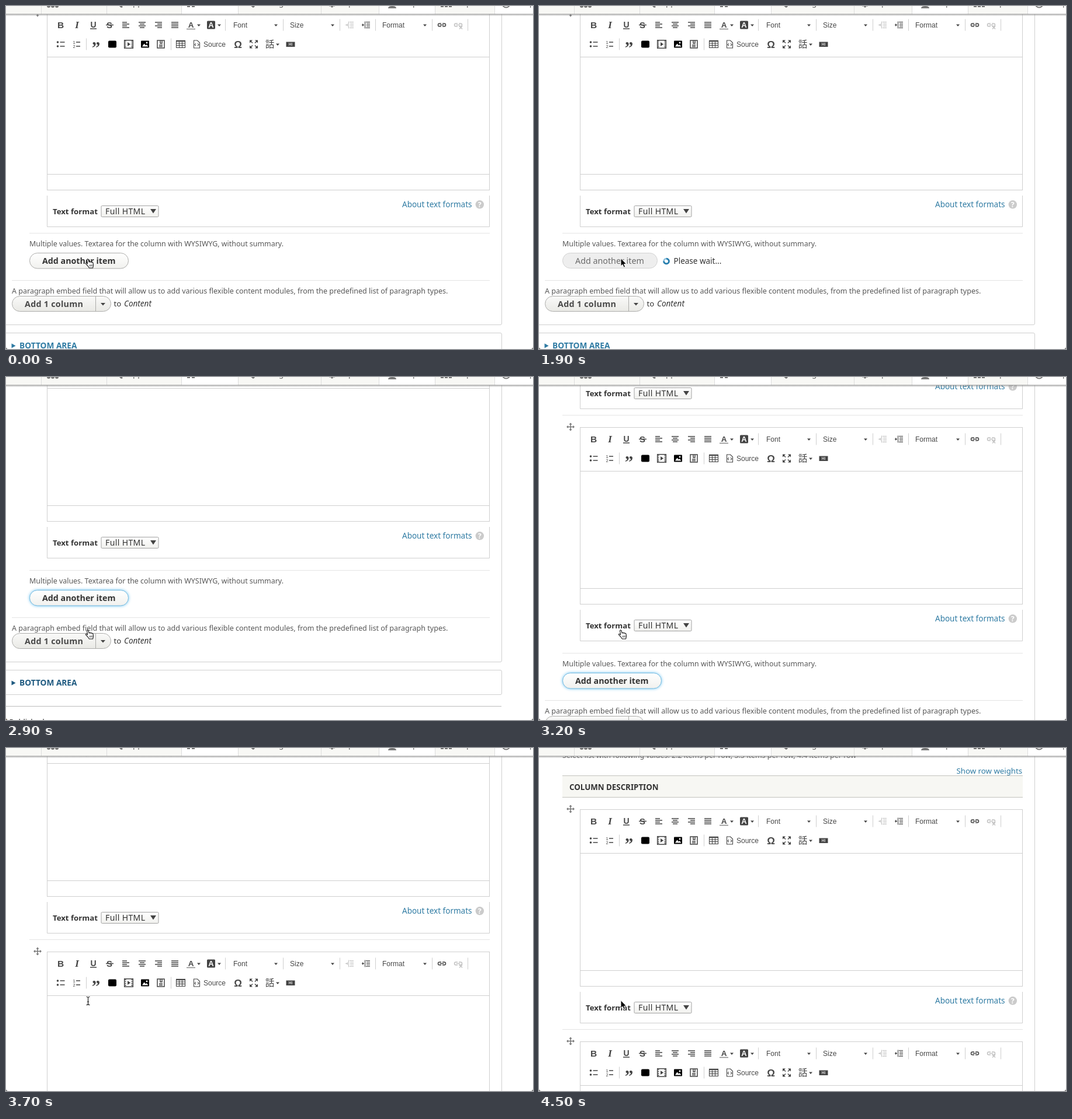
An HTML page that plays this animation: 902x588 px, repeating every 4.6 s.

```html
<!DOCTYPE html>
<html lang="en">
<head>
<meta charset="utf-8">
<title>Add another item</title>
<style>
html, body { margin: 0; width: 100%; height: 100%; overflow: hidden; background: #fff; }
svg { display: block; width: 902px; height: 588px; font-family: "Noto Sans", "Open Sans", sans-serif; }
text { fill: #333; white-space: pre; }
.b { font-weight: 700; }
.ui { font-family: "Liberation Sans", Arial, sans-serif; fill: #484848; }
.serif { font-family: "Liberation Serif", serif; fill: #444; }
.cjk { font-family: "Noto Sans CJK JP", "Noto Sans CJK", sans-serif; fill: #444; }
.note { fill: #585858; }
.link { fill: #2f7ba3; }
.off { opacity: .32; }
.ico { fill: none; stroke: #444; stroke-width: 1.5; }
.thin { stroke-width: 1.1; }
.solid { fill: #444; }
.line { fill: none; stroke: #cfcfcf; }
.soft { stroke: #e4e4e4; }
.btn { fill: url(#btn); stroke: #acacaa; }
.lit { fill: url(#lit); }
.glow { stroke: #74b9de; filter: drop-shadow(0 0 2.5px #6cc3f2); }
</style>
</head>
<body>
<svg viewBox="0 0 902 588">
  <defs>
    <linearGradient id="btn" x2="0" y2="1"><stop stop-color="#fafaf9"/><stop offset="1" stop-color="#e9e9e5"/></linearGradient>
    <linearGradient id="lit" x2="0" y2="1"><stop stop-color="#fff"/><stop offset="1" stop-color="#f1f1ee"/></linearGradient>
    <linearGradient id="blue" x2="0" y2="1"><stop stop-color="#4594d0"/><stop offset="1" stop-color="#3680bd"/></linearGradient>
    <linearGradient id="shade" x2="0" y2="1"><stop stop-color="#777" stop-opacity=".75"/><stop offset="1" stop-color="#999" stop-opacity="0"/></linearGradient>
  </defs>
  <g id="page">
    <g id="head"></g>
    <g id="item"></g>
    <g id="second"><path class="line soft" d="M40 377.5H828"/><use href="#item" y="398"/></g>
    <g id="tail"></g>
  </g>
  <g id="bar"></g>
  <g id="hand">
    <path fill="#fff" stroke="#111" stroke-width="1.1" stroke-linejoin="round"
      d="M139.6 442l-1-6.600c-.3-2 2-2.300 2.500-.4l1.100 4.200c.4-1.300 2-1.200 2.300 0 .6-1 2-.8 2.200.4.8-.7 2-.4 2.200.8l.7 4.300-1 4.300h-6.200l-2.600-3.700-3.200-3.500c-.8-1.500 1-2 3 .2z"/>
    <path stroke="#111" stroke-width=".8" d="M143.4 443.5v3M145.4 443.4v3M147.4 443.3v3"/>
  </g>
  <path id="arrow" fill="#000" stroke="#fff" d="M140 432.5v13.6l3.1-2.900 2.200 5 2.300-1-2.100-4.800h4.200z"/>
  <path id="beam" fill="none" stroke="#222" stroke-width="1.2" d="M137.5 426.5q3 0 3 2v10q0 2-3 2M143.5 426.5q-3 0-3 2v10q0 2 3 2M138.8 435h3.4"/>
  <path fill="#555" d="M0 584q0 4 4 4H0zM902 584q0 4-4 4h4z"/>
</svg>
<script>
const $ = id => document.getElementById(id);
const text = (x, y, size, str, cls = '', more = '') =>
  `<text x="${x}" y="${y}" font-size="${size}" class="${cls}" ${more}>${str}</text>`;
const mid = (x, y, size, str, cls, more = '') => text(x, y, size, str, cls, `text-anchor="middle" ${more}`);
const path = (d, cls = 'ico', more = '') => `<path class="${cls}" d="${d}" ${more}/>`;
const rect = (x, y, w, h, cls, more = '') =>
  `<rect x="${x}" y="${y}" width="${w}" height="${h}" class="${cls}" ${more}/>`;
const caret = (x, y, w = 6, h = 3.4) => path(`M${x - w / 2} ${y}h${w}l${-w / 2} ${h}z`, 'solid');
const bars = (x, y, rows, gap = 3, cls = 'ico') =>
  path(rows.map(([dx, w], i) => `M${x + dx} ${y + i * gap}h${w}`).join(''), cls);
const seps = (y, xs) => path(xs.map(x => `M${x + .5} ${y - 10}v20`).join(''), 'line');

function firstRow(y) {
  const base = y + 5.5;
  const indent = (x, tip) => bars(x, y - 5, [[0, 7], [1, 6], [1, 6], [1, 6], [0, 7]], 2.5, 'ico thin') +
    path(`M${x - 1.5} ${y - 6}v12M${x - 7} ${y}h4`, 'ico thin') +
    path(`M${x - 4.5 + tip} ${y - 2.5}v5l${-2 * tip} -2.5z`, 'solid');
  const link = x => path(`M${x - 1} ${y - 2.5}h-3a2.5 2.5 0 0 0 0 5h3M${x + 1} ${y - 2.5}h3a2.5 2.5 0 0 1 0 5h-3M${x - 3.5} ${y}h7`);
  return mid(93.5, base, 15.5, 'B', 'ui b') +
    mid(121.5, base, 17, 'I', 'serif b', 'font-style="italic"') +
    mid(149.5, base - 1, 14, 'U', 'ui b') + path(`M144 ${y + 6.5}h11`) +
    mid(177, base, 15, 'S', 'ui b') + path(`M171 ${y}h13`) +
    bars(199, y - 4.5, [[0, 8], [0, 12], [0, 8], [0, 12]]) +
    bars(227, y - 4.5, [[0, 12], [2, 8], [0, 12], [2, 8]]) +
    bars(255, y - 4.5, [[0, 12], [4, 8], [0, 12], [4, 8]]) +
    bars(283, y - 4.5, [[0, 12], [0, 12], [0, 12], [0, 12]]) +
    mid(316.5, base - 1.5, 13.5, 'A', 'ui b') + path(`M309 ${y + 7}h15`, 'ico', 'style="stroke:#888"') + caret(330, y - 1) +
    rect(344, y - 7, 14, 14, 'solid', 'rx="1.5"') +
    mid(351, y + 4.7, 13, 'A', 'ui b', 'style="fill:#fff"') + caret(365, y - 1) +
    text(389, y + 4, 12, 'Font', 'ui') + caret(462, y - 1) +
    text(486, y + 4, 12, 'Size', 'ui') + caret(559, y - 1) +
    `<g class="off">${indent(588, 1.5)}</g>` + indent(616, -1.5) +
    text(644, y + 4, 12, 'Format', 'ui') + caret(717, y - 1) +
    link(746) + `<g class="off">${link(774)}${path(`M776 ${y + 2}l5 5m0 -5l-5 5`)}</g>` +
    seps(y, [375, 474, 571, 632, 729, 790]);
}

function secondRow(y) {
  const dots = [-3.5, 3.5].map(d => `<circle cx="88.5" cy="${y + d}" r="1.8" class="solid"/>`).join('');
  const digits = [1, 2].map((n, i) => text(114.5, y - .5 + i * 7, 7.5, n, 'ui')).join('');
  const arm = (sx, sy) => path(`M${424 + 2 * sx} ${y + 2 * sy}l${4 * sx} ${4 * sy}`) +
    path(`M${424 + 7 * sx} ${y + 7 * sy}h${-5 * sx}l${5 * sx} ${-5 * sy}z`, 'solid');
  return dots + bars(92.5, y - 3.5, [[0, 8], [0, 8]], 7) +
    digits + bars(120, y - 3.5, [[0, 7], [0, 7]], 7) +
    mid(154, y + 15.5, 29, '”', 'serif b') +
    rect(175, y - 6, 14, 12, '', 'rx="2"') +
    rect(202.7, y - 6.8, 14.6, 13.6, 'ico') +
    path(`M204.5 ${y - 6}v12M215.5 ${y - 6}v12`, 'ico', 'stroke-dasharray="1.6 1.6" style="stroke-width:2"') +
    path(`M208 ${y - 3.5}v7l5 -3.5z`, 'solid') +
    rect(231, y - 6, 14, 12, '', 'rx="1"') +
    path(`M233 ${y + 4}l3.5 -5 2.5 3 1.5 -1.5 3 3.5z`, '', 'fill="#fff"') + `<circle cx="241" cy="${y - 2.5}" r="1.4" fill="#fff"/>` +
    path(`M259 ${y - 6.5}h12v13h-12zM262 ${y + 4}h6M262 ${y + 1.5}h6M264 ${y - 6}v4.5h3v-5`) +
    path(`M291.5 ${y - 6}h15v12h-15zM291.5 ${y - 1.5}h15M291.5 ${y + 2}h15M296.5 ${y - 4}v10M301.5 ${y - 4}v10`, 'ico thin') +
    path(`M291 ${y - 5.5}h16`, 'ico', 'style="stroke-width:2.4"') +
    path(`M321.5 ${y - 6.5}h6l4 4v9h-10zM325 ${y - 1.5}l-2 2.2 2 2.2M328 ${y - 1.5}l2 2.2-2 2.2`, 'ico thin') +
    text(338, y + 4, 12, 'Source', 'ui') +
    mid(397, y + 6, 17, 'Ω', 'ui b') +
    arm(-1, -1) + arm(1, -1) + arm(-1, 1) + arm(1, 1) +
    mid(451.5, y + 5.5, 15.5, '話', 'cjk') + caret(465, y - 1) +
    rect(479.5, y - 4, 15, 8.5, 'solid') + mid(487, y + 2.7, 6.5, 'Hi', 'ui b', 'style="fill:#ddd"') +
    seps(y, [137, 282]);
}

function editor() {
  const tip = a => `<path d="M-2.6 -4h5.2L0 -7z" transform="translate(54 -.5) rotate(${a})" fill="#777"/>`;
  return path('M54 -6V5M48.5 -.5H59.5', 'ico', 'style="stroke:#777"') + [0, 90, 180, 270].map(tip).join('') +
    rect(70.5, .5, 757, 303, 'line') + path('M70.5 75.5H827.5M70.5 276.5H827.5', 'line') +
    firstRow(20.5) + secondRow(53.5) +
    path('M70.5 313V366.5H827.5V313', 'line') +
    text(80, 344.5, 13.2, 'Text format', 'b') +
    rect(163, 330.5, 98, 19, 'lit', 'rx="1.5" stroke="#a2a2a2"') +
    text(170, 344.5, 14, 'Full HTML', '', 'letter-spacing=".38"') + caret(252, 336, 10, 7.5) +
    text(678, 333, 13.5, 'About text formats', 'link') +
    '<circle cx="810.8" cy="328.3" r="7.2" fill="#cbcbcb"/>' + mid(810.8, 333, 12.5, '?', 'b', 'style="fill:#fff"');
}

function intro() {
  return text(40, -88, 12.45, 'Select list with following values: 2:2 items per row, 3:3 items per row, 4:4 items per row', 'note') +
    text(714.5, -61, 13.25, 'Show row weights', 'link') +
    rect(40, -57, 788, 37, '', 'fill="#f7f7f3"') + path('M40 -57.5H828M40 -20.5H828', 'line', 'style="stroke:#c3c3be"') +
    text(52, -33, 13.3, 'COLUMN DESCRIPTION', 'b');
}

function footer() {
  return path('M40 .5H828M10 81.5H828', 'line soft') +
    text(40, 23, 12.43, 'Multiple values. Textarea for the column with WYSIWYG, without summary.', 'note') +
    `<g id="ready">${rect(40.5, 34.5, 169, 26.5, 'btn lit', 'id="add" rx="13.2"')}${text(62, 53, 14.25, 'Add another item', 'b')}</g>` +
    `<g id="busy">${rect(40.5, 34.5, 162, 26, '', 'rx="13" fill="#eee" stroke="#d2d2d2"')}` +
    text(62, 53, 14.3, 'Add another item', '', 'style="fill:#6a6a6a"') +
    '<circle cx="218" cy="48.5" r="4.4" fill="none" stroke="#8dc0dc" stroke-width="2.6"/>' +
    '<path id="spin" d="M218 44.1a4.4 4.4 0 1 1 -4.4 4.4" fill="none" stroke="#2a7fae" stroke-width="2.8"/>' +
    text(230.5, 53, 13.5, 'Please wait...') + '</g>' +
    text(10, 103.5, 12.52, 'A paragraph embed field that will allow us to add various flexible content modules, from the predefined list of paragraph types.', 'note') +
    rect(10.5, 108.5, 169, 26, 'btn', 'rx="13"') + path('M153.5 109V134', 'line', 'style="stroke:#acacaa"') +
    text(32, 126.5, 14.3, 'Add 1 column', 'b', 'letter-spacing=".27" style="fill:#4a4a4a"') + caret(166, 120, 8, 4.5) +
    text(184.5, 126, 13.2, 'to') + text(202, 126, 13.5, 'Content', '', 'font-style="italic"') +
    path('M848.5 -1400V155q0 2.5 -2.5 2.5H0M0 171.5H846q2.5 0 2.5 2.5V211q0 2.5 -2.5 2.5H0', 'line') +
    `<g id="area" class="link">${path('M9.5 189.5v8l7 -4z', '')}${text(23, 198, 13.7, 'BOTTOM AREA', 'b', 'style="fill:inherit"')}</g>` +
    path('M0 233.5H848', 'line', 'style="stroke:#bcbcbc"') +
    rect(0, 255, 1.5, 11, '', 'fill="#cfa36c"') + text(5.5, 265, 13, 'Published') +
    rect(-30, 283.5, 96, 26.5, '', 'rx="13.2" fill="url(#blue)" stroke="#3a70a0"') + text(11, 302, 14.2, 'Save', 'b', 'style="fill:#fff"') +
    rect(84.5, 283.5, 99.5, 26.5, 'btn', 'rx="13.2"') + text(106, 302, 14.2, 'Preview', 'b');
}

function topBar() {
  const stops = [0, 60, 172, 300, 397, 539, 638, 734, 836, 902];
  const tabs = stops.slice(1).map((end, i) =>
    rect(stops[i], -1, end - stops[i], 15, '', `fill="${[3, 6, 8].includes(i) ? '#fff' : '#f8f8f5'}"`)).join('');
  const tails = [[217, 'pp'], [467, 'g'], [586, 'p'], [696, 'p'], [788, 'p'], [896, 'p']]
    .map(([x, s]) => text(x, -1.5, 13.5, s, '', 'style="fill:#666"')).join('');
  const icons = [73, 80, 87].map(x => `<circle cx="${x}" cy="0" r="3"/>`).join('') +
    '<path d="M193 -1l4 4 3 -1-3 -4zM310 -1h5v3h-5zM318 -1h5v3h-5zM418 -1l5 4 3 -2-3 -3zM553 -1h10v1.5h-3.5v2h-3v-2h-3.5z' +
    'M654 4q0 -4 7 -4t7 4zM744 -1h5v3h-5zM751 -1h5v3h-5zM758 -1h5v3h-5z"/>' +
    '<circle cx="856" cy="-4" r="6.5" fill="none" stroke="#777" stroke-width="1.8"/>';
  return tabs + path(stops.slice(1, -1).map(x => `M${x + .5} 0V14`).join(''), 'line', 'style="stroke:#ddd"') +
    `<g fill="#777">${icons}</g>` + tails + rect(0, 13.5, 902, 4, '', 'fill="url(#shade)"');
}

$('head').innerHTML = intro();
$('item').innerHTML = editor();
$('tail').innerHTML = footer();
$('bar').innerHTML = topBar();

const LOOP = 4600, STEP = 100;
const PRESS = 500, BUSY = 700, ADDED = 2100, HOVER = 2300;
// time, page offset, speed in px per ms
const scroll = [[2600, -529, 0], [3200, -312, .45], [3700, -49, .48], [4000, 78, .25], [4300, 105, 0]];
const cursors = [[0, 'hand'], [BUSY, 'arrow'], [HOVER, 'hand'], [3400, 'beam'], [4400, 'arrow']];

function offset(t) {
  if (t < ADDED) return 12;
  if (t <= scroll[0][0]) return scroll[0][1];
  const i = scroll.findIndex(k => k[0] > t);
  if (i < 0) return scroll.at(-1)[1];
  const [t0, y0, v0] = scroll[i - 1], [t1, y1, v1] = scroll[i];
  const d = t1 - t0, u = (t - t0) / d, w = 1 - u;
  return Math.round(w * w * (1 + 2 * u) * y0 + u * u * (3 - 2 * u) * y1 + d * u * w * (w * v0 - u * v1));
}

const show = (id, on) => $(id).setAttribute('visibility', on ? 'visible' : 'hidden');
const move = (id, y) => $(id).setAttribute('transform', `translate(0 ${y})`);

function draw(t) {
  const added = t >= ADDED, busy = t >= BUSY && !added;
  move('page', offset(t));
  move('tail', added ? 785 : 377);
  show('second', added);
  show('ready', !busy);
  show('busy', busy);
  $('add').classList.toggle('glow', t >= PRESS);
  $('area').style.fill = t >= HOVER ? '#1f5a80' : '';
  $('spin').setAttribute('transform', `rotate(${(Math.min(t, 1900) - 1100) / STEP * 45} 218 48.5)`);
  const cursor = cursors.findLast(c => c[0] <= t)[1];
  for (const id of ['hand', 'arrow', 'beam']) show(id, id === cursor);
}

const start = performance.now();
function tick() {
  const t = (performance.now() - start) % LOOP;
  draw(Math.floor(t / STEP) * STEP);
  requestAnimationFrame(tick);
}
tick();
</script>
</body>
</html>
```
